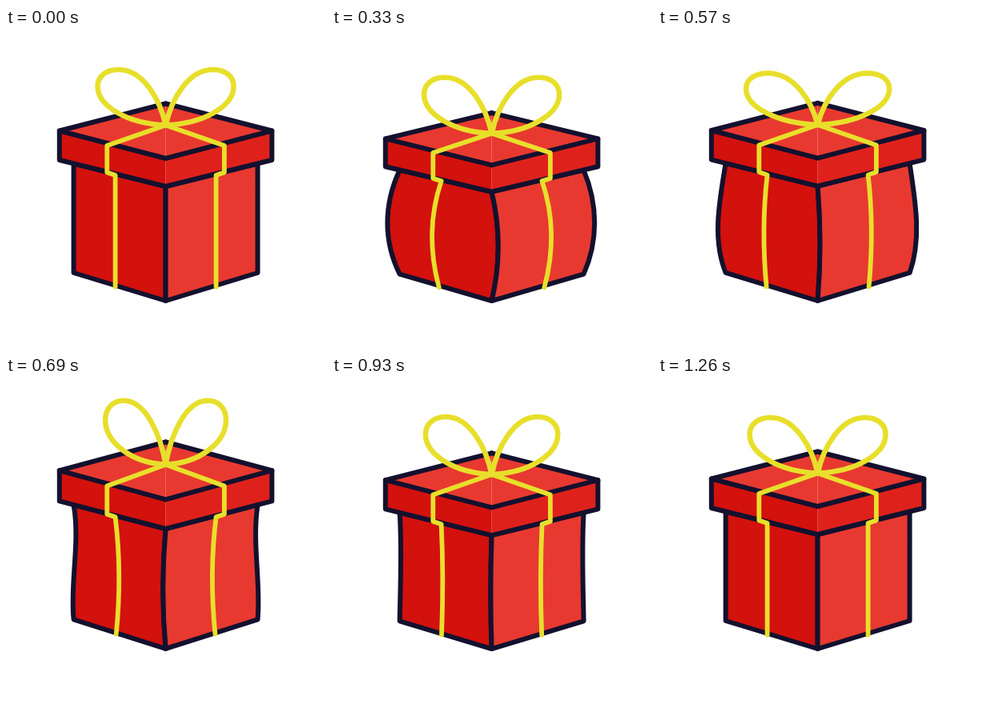
Animation, 400 px wide and 400 px high, one loop 1390 ms. Source, as an HTML page with a canvas:

```html
<!DOCTYPE html>
<html lang="en">
<head>
<meta charset="utf-8">
<title>Gift box</title>
<style>
  html, body { margin: 0; width: 100%; height: 100%; overflow: hidden; background: #fff; }
  canvas { display: block; width: 400px; height: 400px; }
</style>
</head>
<body>
<canvas id="stage" width="400" height="400"></canvas>
<script>
const ctx = document.getElementById('stage').getContext('2d');
const LOOP = 1390, STEP = 30, LAST = 1260;
const CENTER = 199.6, FLOOR = 341.5, KNOT = 121.5;
const INK = '#13112e', GOLD = '#e8df2b';
const DEEP = '#d3110d', BRIGHT = '#e83930', MID = '#df211c';

// Cosine easing from one [time, value] pose to the next.
const swing = (...poses) => t => {
  const next = poses.findIndex(([time]) => time > t);
  if (next < 0) return poses.at(-1)[1];
  const [t0, a] = poses[next - 1], [t1, b] = poses[next];
  return a + (b - a) * (1 - Math.cos(Math.PI * (t - t0) / (t1 - t0))) / 2;
};

// Squash, rebound and settle; the lower half of the box lets go later, the bow trails.
const squash = swing([0, 0], [425, .053], [700, -.049], [980, .012], [LAST, 0]);
const bend = swing([0, 0], [290, 11], [430, 11], [740, -5.5], [1040, 0]);
const lateBend = swing([0, 0], [290, 11], [500, 11], [800, -1], [1040, 0]);
const bowStretch = swing([0, 0], [190, .045], [560, -.075], [690, .15], [880, .036], [1140, .036], [LAST, 0]);

function poly(...points) {
  const path = new Path2D();
  points.forEach(([x, y]) => path.lineTo(x, y));
  return path;
}

function fill(path, color) {
  ctx.fillStyle = color;
  ctx.fill(path);
}

function stroke(path, color, width) {
  ctx.strokeStyle = color;
  ctx.lineWidth = width;
  ctx.stroke(path);
}

// Calls paint for the left and right half with a mirrored x helper.
function mirrored(paint) {
  for (const side of [-1, 1]) paint(d => CENTER + side * d, side < 0);
}

function drawBody(y, t) {
  const edge = CENTER + bend(t);
  mirrored((x, isLeft) => {
    const bulge = isLeft ? 1.85 : 1.65;
    const face = new Path2D();
    face.moveTo(CENTER, y(198));
    face.lineTo(x(115), y(169.5));
    face.bezierCurveTo(x(115 + bulge * bend(t)), y(215), x(115 + bulge * lateBend(t)), y(263), x(115), y(306));
    face.lineTo(CENTER, y(341));
    face.bezierCurveTo(edge, y(293), edge, y(246), CENTER, y(198));
    fill(face, isLeft ? DEEP : BRIGHT);
    stroke(face, INK, 6);
  });
}

function drawLid(y) {
  const back = [CENTER, y(94.5)], front = [CENTER, y(163)], foot = [CENTER, y(198)];
  mirrored((x, isLeft) => {
    const corner = [x(132.8), y(128.5)], cornerFoot = [x(132.8), y(165)];
    fill(poly(back, corner, front), BRIGHT);
    fill(poly(corner, front, foot, cornerFoot), isLeft ? DEEP : MID);
    stroke(poly(back, corner, cornerFoot, foot), INK, 6);
    stroke(poly(corner, front), INK, 6);
  });
}

function drawRibbon(y, t) {
  const bow = bend(t) * 1.35;
  mirrored(x => {
    const band = poly([CENTER, y(KNOT)], [x(73.3), y(147)], [x(73.3), y(180.5)], [x(63), y(184)]);
    band.bezierCurveTo(x(63 + bow), y(230), x(63 + bow), y(277), x(63 + bow * .19), y(323.5));
    stroke(band, GOLD, 5.8);
  });
}

function drawBow(y, t) {
  const stretch = bowStretch(t);
  mirrored(x => {
    const at = (dx, dy) => [x(dx * (1 - .75 * stretch)), y(KNOT) - dy * (1 + stretch)];
    const loop = new Path2D();
    loop.moveTo(...at(0, 0));
    loop.bezierCurveTo(...at(50, 2), ...at(85, 25), ...at(85, 48.5));
    loop.bezierCurveTo(...at(85, 61.5), ...at(74, 69.5), ...at(59, 69.5));
    loop.bezierCurveTo(...at(28, 69.5), ...at(7, 32), ...at(0, 0));
    stroke(loop, GOLD, 6.5);
  });
}

function draw(t) {
  const scale = 1 - squash(t);
  const y = v => FLOOR - (FLOOR - v) * scale;
  ctx.clearRect(0, 0, 400, 400);
  ctx.lineJoin = ctx.lineCap = 'round';
  drawBody(y, t);
  drawLid(y);
  drawRibbon(y, t);
  drawBow(y, t);
}

function tick() {
  const t = performance.now() % LOOP;
  draw(Math.min(LAST, Math.floor(t / STEP) * STEP));
  requestAnimationFrame(tick);
}
tick();
</script>
</body>
</html>
```
